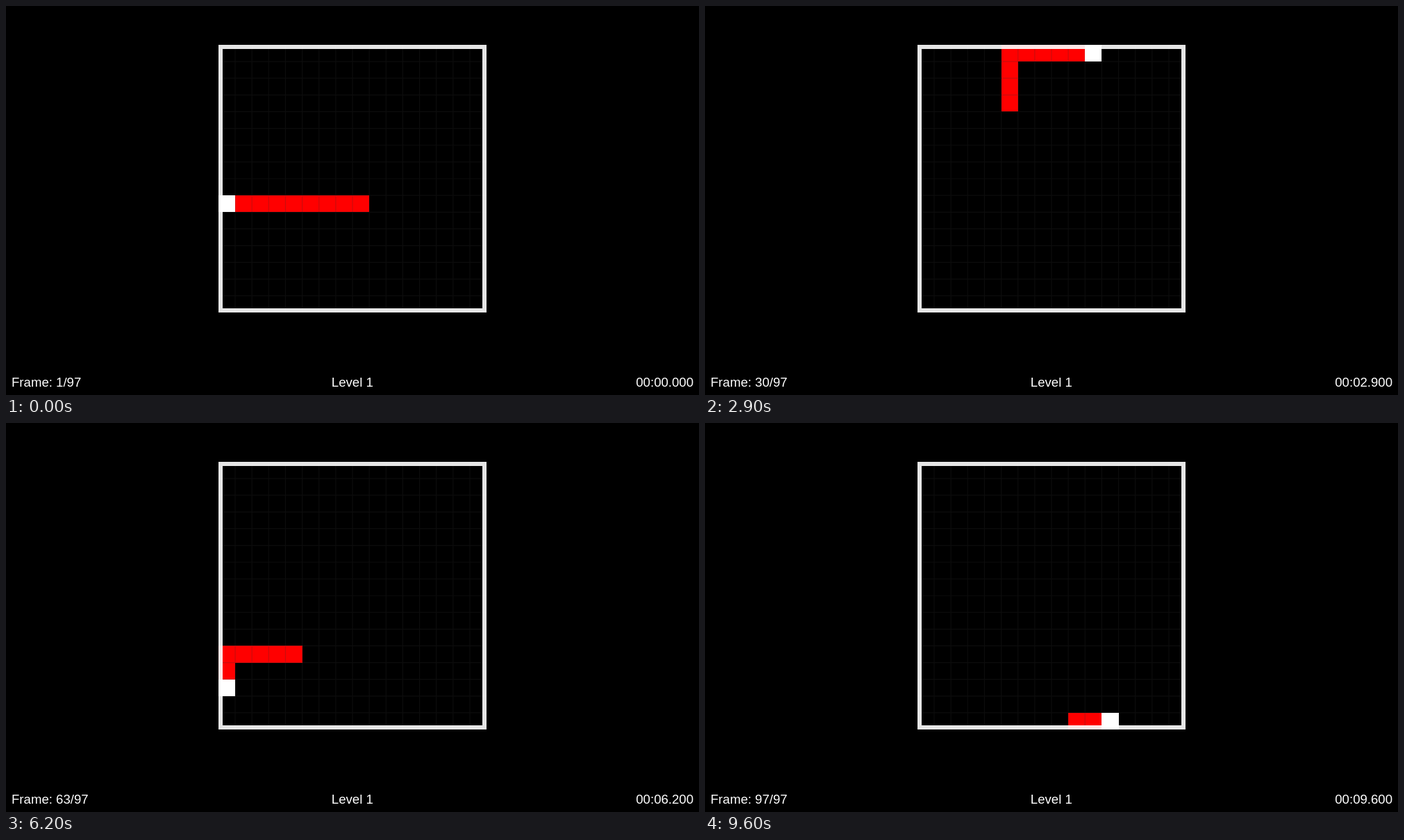
Recreate the animation shown at these times as an HTML page. Size 998x561 px, loop 9700 ms.

```html
<!DOCTYPE html>
<html lang="en">
<head>
<meta charset="utf-8">
<title>Grid walker</title>
<style>
html, body { margin: 0; width: 100%; height: 100%; overflow: hidden; background: #000; }
svg { display: block; width: 100%; height: 100%; }
text { font-family: "Liberation Sans", Arial, sans-serif; font-size: 18.6px; fill: #fff; }
</style>
</head>
<body>
<svg viewBox="0 0 998 561">
  <rect width="998" height="561" fill="#000"/>
  <g id="trail" fill="#f00"></g>
  <path id="grid" fill="none" stroke="#323232" stroke-opacity=".25" stroke-width="1.2"/>
  <rect id="head" fill="#fff"/>
  <rect x="309" y="59" width="380" height="380" fill="none" stroke="#fff" stroke-opacity=".9" stroke-width="6"/>
  <text id="count" x="8" y="549.3"></text>
  <text x="498.8" y="549.3" text-anchor="middle">Level 1</text>
  <text id="clock" x="990" y="549.3" text-anchor="end"></text>
</svg>
<script>
const STEPS = 97, STEP_MS = 100, TRAIL = 8;
const CELLS = 16, LEFT = 305.9, TOP = 55.9, SIZE = 24.1375;
const DIRS = { L: [-1, 0], R: [1, 0], U: [0, -1], D: [0, 1] };

// Each run: first step, start cell, moves (direction and distance).
const RUNS = [
  [-8, 8, 9, "L8 U9 R1"],
  [11, 5, 13, "U13 R9"],
  [34, 1, 3, "L1 U3 D3 U3 R11"],
  [56, 4, 11, "L4 D4"],
  [65, 4, 8, "D3"],
  [69, 0, 15, "R15"],
  [85, 12, 10, "D4"],
  [90, 9, 15, "R1 L1 R1 L1 R2"]
].map(([start, x, y, moves]) => {
  const cells = [[x, y]];
  for (const move of moves.split(" ")) {
    const [dx, dy] = DIRS[move[0]];
    for (let n = +move.slice(1); n > 0; n--) cells.push([x += dx, y += dy]);
  }
  return { start, cells };
});

const $ = id => document.getElementById(id);
const edgeX = i => Math.round(LEFT + i * SIZE);
const edgeY = i => Math.round(TOP + i * SIZE);
const pad = (n, len) => String(n).padStart(len, "0");

function place(rect, cell) {
  rect.setAttribute("visibility", cell ? "visible" : "hidden");
  if (!cell) return;
  const [x, y] = cell;
  rect.setAttribute("x", edgeX(x));
  rect.setAttribute("y", edgeY(y));
  rect.setAttribute("width", edgeX(x + 1) - edgeX(x));
  rect.setAttribute("height", edgeY(y + 1) - edgeY(y));
}

let lines = "";
for (let i = 1; i < CELLS; i++) {
  lines += `M${LEFT + i * SIZE} 56V442M306 ${TOP + i * SIZE}H692`;
}
$("grid").setAttribute("d", lines);

const trail = Array.from({ length: TRAIL }, () =>
  $("trail").appendChild(document.createElementNS("http://www.w3.org/2000/svg", "rect")));

function draw(step) {
  const run = RUNS.filter(r => r.start <= step).pop();
  const at = step - run.start;
  place($("head"), run.cells[at]);
  trail.forEach((rect, i) => place(rect, run.cells[at - 1 - i]));
  const ms = step * STEP_MS;
  $("count").textContent = `Frame: ${step + 1}/${STEPS}`;
  $("clock").textContent = `00:${pad(Math.floor(ms / 1000), 2)}.${pad(ms % 1000, 3)}`;
}

let shown = -1;
const begin = performance.now();
function tick() {
  const step = Math.floor((performance.now() - begin) / STEP_MS) % STEPS;
  if (step !== shown) draw(shown = step);
  requestAnimationFrame(tick);
}
tick();
</script>
</body>
</html>
```
